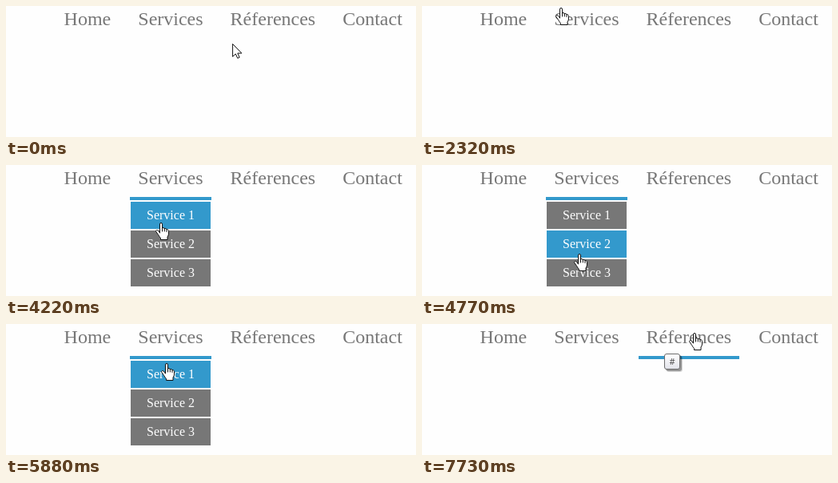
Recreate the animation shown at these times as an HTML page. Size 513 by 164 pixels, loop 8000 ms.

```html
<!DOCTYPE html>
<html lang="fr">
<head>
<meta charset="utf-8">
<title>Menu</title>
<style>
  html, body { margin: 0; width: 100%; height: 100%; overflow: hidden; background: #fefefe; }
  svg { display: block; width: 513px; height: 164px; }
  text { font-family: "Liberation Serif", serif; }
  .nav { font-size: 24px; fill: #777; }
  .item text { font-size: 16px; fill: #fff; }
  .tip text { font: 11px "Open Sans", sans-serif; fill: #444; }
  .cursor { fill: #fff; stroke: #111; stroke-linejoin: round; stroke-linecap: round; }
</style>
</head>
<body>
<svg viewBox="0 0 513 164">
  <defs>
    <clipPath id="fold"><rect id="foldBox" x="150" y="46" width="112" height="0"/></clipPath>
    <linearGradient id="sheen" x2="0" y2="1">
      <stop offset="0" stop-color="#fff"/>
      <stop offset="1" stop-color="#e2e3ea"/>
    </linearGradient>
  </defs>
  <g id="nav" class="nav"></g>
  <rect id="line" y="40" height="4" fill="#39c"/>
  <g id="menu" clip-path="url(#fold)"></g>
  <g id="tip" class="tip">
    <rect x="306" y="40" width="20" height="20" rx="3" fill="#000" opacity=".15"/>
    <rect x="305" y="39" width="20" height="20" rx="3" fill="#000" opacity=".3"/>
    <rect x="303.5" y="37.5" width="19" height="19" rx="2.5" fill="url(#sheen)" stroke="#6c6c6c"/>
    <text x="309.5" y="51">#</text>
  </g>
  <g id="arrow" class="cursor">
    <path d="M.6 .9V16.4L4.3 13L6.8 18.4L9.2 17.3L6.8 12.1H11.5Z"/>
  </g>
  <g id="hand" class="cursor">
    <path d="M5.5 12.8V2.1Q5.5 .5 7 .5Q8.5 .5 8.5 2.1V7.2Q8.8 6.3 9.9 6.5Q11.2 6.7 11.3 8Q11.8 7.2 12.9 7.5Q14 7.8 14 9Q14.5 8.4 15.4 8.8Q16.5 9.3 16.5 10.6V14Q16.5 16 15 18V21.5H6.5V19.5Q5 18 3.5 15.3L.8 11.5Q.2 10 1.4 9.6Q2.6 9.2 4 10.8Z"/>
    <path d="M8.5 7V11M11.3 8V11M14 9V11.5" fill="none"/>
  </g>
</svg>
<script>
const NS = "http://www.w3.org/2000/svg";
const LOOP = 8000;
const $ = id => document.getElementById(id);

function add(parent, tag, attrs, text = "") {
  const el = document.createElementNS(NS, tag);
  for (const k in attrs) el.setAttribute(k, attrs[k]);
  el.textContent = text;
  return parent.appendChild(el);
}

const links = { Home: 72.6, Services: 165.3, "Réferences": 280.6, Contact: 421.2 };
for (const name in links) add($("nav"), "text", { x: links[name], y: 24 }, name);

const items = [1, 2, 3].map((n, i) => {
  const g = add($("menu"), "g", { class: "item", transform: `translate(156 ${46 + 36 * i})` });
  const box = add(g, "rect", { width: 100, height: 34 });
  add(g, "text", { x: 20, y: 22 }, "Service " + n);
  return box;
});

// Every track lists [start time, value...]; a value holds until the next entry.
const pointer = [
  [0, "arrow", 283, 47], [590, "arrow", 283, 48], [1040, ""],
  [2320, "hand", 167, 2], [3280, "hand", 172, 7],
  [3430, "hand", 179, 20], [3560, "arrow", 190, 41],
  [3710, "hand", 186, 58], [3830, "hand", 187, 67], [3970, "hand", 187, 70],
  [4220, "hand", 187, 72], [4370, "hand", 188, 87], [4500, "hand", 190, 102],
  [4640, "hand", 190, 107], [4770, "hand", 190, 111],
  [4920, "hand", 190, 122], [5050, "hand", 191, 132],
  [5200, "hand", 191, 133], [5330, "hand", 191, 132],
  [5480, "hand", 192, 114], [5610, "hand", 193, 91], [5730, "hand", 194, 69],
  [5880, "hand", 194, 49], [6010, "hand", 194, 29], [6160, "hand", 195, 29],
  [6460, "hand", 215, 18], [6610, "arrow", 260, 13], [6740, "hand", 280, 15],
  [6890, "hand", 299, 14], [7450, "hand", 299, 13],
  [7600, "hand", 318, 12], [7730, "hand", 334, 11]
];
const underline = [[0, 0, 0], [2450, 155, 102], [6610, 0, 0], [6740, 271, 126]];
const height = [[0, 0], [2450, 62], [2570, 106], [6890, 39], [7040, 12], [7170, 0]];
const hover = [[0, -1], [3710, 0], [4370, 1], [4920, 2], [5480, 1], [5730, 0], [6010, -1]];
const tipAlpha = [[0, 0], [7450, 0.6], [7600, 1]];

const at = (track, t) => track.findLast(step => step[0] <= t).slice(1);

function draw(t) {
  const [kind, x, y] = at(pointer, t);
  for (const id of ["arrow", "hand"]) {
    $(id).setAttribute("visibility", id === kind ? "visible" : "hidden");
    if (id === kind) $(id).setAttribute("transform", `translate(${x} ${y})`);
  }
  const [left, width] = at(underline, t);
  $("line").setAttribute("x", left);
  $("line").setAttribute("width", width);
  $("foldBox").setAttribute("height", at(height, t)[0]);
  const active = at(hover, t)[0];
  items.forEach((box, i) => box.setAttribute("fill", i === active ? "#39c" : "#777"));
  $("tip").setAttribute("opacity", at(tipAlpha, t)[0]);
}

const start = performance.now();
function tick() {
  draw((performance.now() - start) % LOOP);
  requestAnimationFrame(tick);
}
tick();
</script>
</body>
</html>
```
